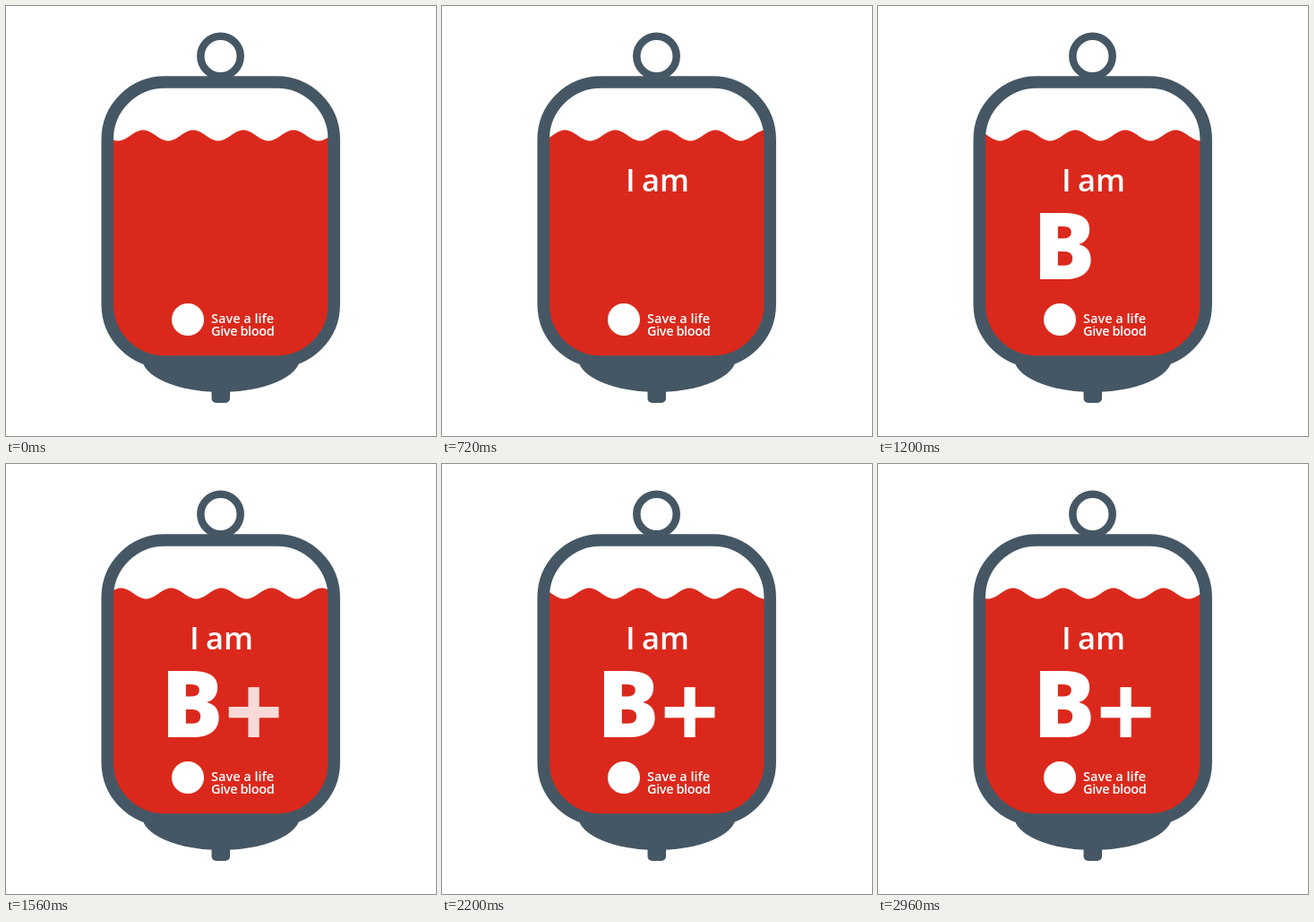
An HTML page that plays this animation: 480x480 px, repeating every 3000 ms.

```html
<!DOCTYPE html>
<html lang="en">
<head>
<meta charset="utf-8">
<title>Blood bag</title>
<style>
  html, body { margin: 0; width: 100%; height: 100%; overflow: hidden; background: #fff; }
  svg { display: block; width: 100vw; height: 100vh; }
  text { font-family: "Open Sans", "Noto Sans", sans-serif; font-weight: 600; fill: #fff; }
  .slate { fill: #455764; }
  .line { fill: none; stroke: #455764; }
  .small { font-size: 14.5px; }
</style>
</head>
<body>
<svg viewBox="0 0 480 480">
  <clipPath id="inside"><rect x="114" y="86" width="252" height="311" rx="63"/></clipPath>
  <ellipse class="slate" cx="240" cy="393" rx="88" ry="38"/>
  <rect class="slate" x="229.5" y="422" width="20.5" height="21" rx="5"/>
  <g clip-path="url(#inside)"><path id="blood" fill="#da291c"/></g>
  <rect class="line" x="113.2" y="85" width="253" height="312" rx="64" stroke-width="13.5"/>
  <circle class="line" cx="239.5" cy="56" r="22.2" stroke-width="8.5"/>

  <text class="word" x="205" y="207" font-size="35">I</text>
  <text class="word" x="223" y="207" font-size="34.5">am</text>
  <text class="word" x="173" y="304.5" font-size="103" style="font-weight:800">B</text>
  <text class="word" x="276.5" y="317.5" font-size="115" text-anchor="middle" style="font-weight:700">+</text>

  <circle cx="203" cy="350" r="18" fill="#fff"/>
  <text class="small" x="229" y="354">Save a life</text>
  <text class="small" x="229" y="367.5" letter-spacing="-.4">Give blood</text>
</svg>
<script>
  const LOOP = 3000, FRAME = 40, WAVE = 56, FADE = 240;
  const starts = [100, 335, 800, 1360];
  const blood = document.getElementById('blood');
  const words = document.querySelectorAll('.word');

  // One wave length per second; the first crest lies at x = 153.
  let outline = 'M40 400';
  for (let x = 40; x <= 380; x += 2) {
    outline += `L${x} ${(144.5 - 6 * Math.cos((x - 153) / WAVE * 2 * Math.PI)).toFixed(2)}`;
  }
  blood.setAttribute('d', outline + 'V400Z');

  function draw() {
    const t = Math.floor(performance.now() % LOOP / FRAME) * FRAME;
    blood.setAttribute('transform', `translate(${t % 1000 / 1000 * WAVE})`);
    words.forEach((word, i) => {
      word.setAttribute('opacity', Math.min(1, Math.max(0, (t - starts[i]) / FADE)));
    });
    requestAnimationFrame(draw);
  }
  draw();
</script>
</body>
</html>
```
